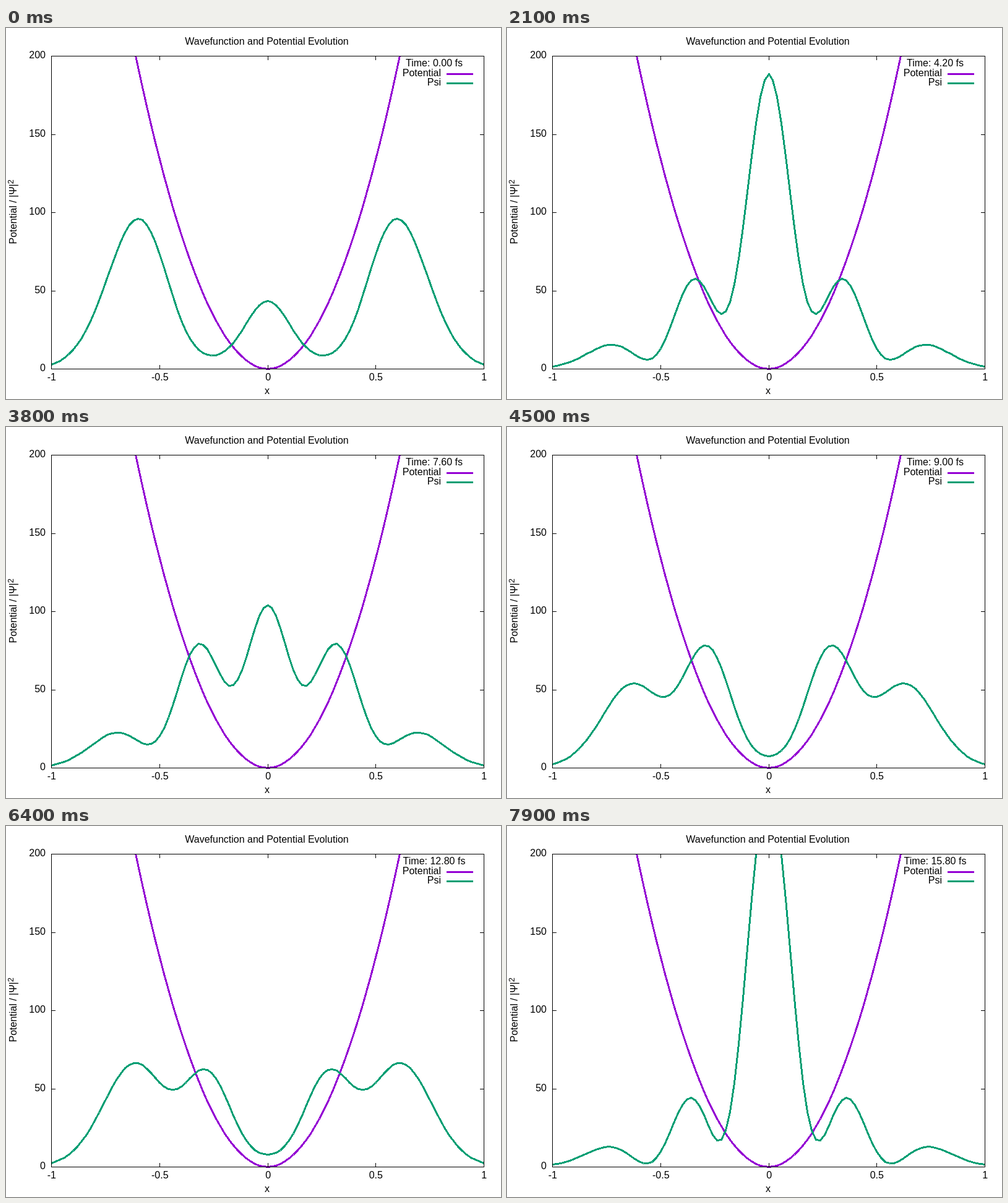
Animation, 800 px wide and 600 px high, one loop 8 s. Source, as an HTML page:

```html
<!DOCTYPE html>
<html lang="en">
<head>
<meta charset="utf-8">
<title>Wavefunction and Potential Evolution</title>
<style>
  html, body { margin: 0; width: 100%; height: 100%; overflow: hidden; background: #fff; }
  svg { display: block; }
  text { font: 16px "Liberation Sans", Arial, sans-serif; fill: #000; }
  .mid { text-anchor: middle; }
  .end { text-anchor: end; }
  .curve, .frame { fill: none; shape-rendering: crispEdges; }
  .curve { stroke-width: 3; stroke-linejoin: round; }
  .frame { stroke: #000; stroke-width: 1; }
  .potential { stroke: #9400d3; }
  .psi { stroke: #009e73; }
</style>
</head>
<body>
<svg width="800" height="600" viewBox="0 0 800 600">
  <clipPath id="area"><rect x="72" y="45" width="701" height="508"/></clipPath>
  <g clip-path="url(#area)">
    <path id="potential" class="curve potential"/>
    <path id="psi" class="curve psi"/>
  </g>
  <path class="curve potential" d="M712 74.5H755"/>
  <path class="curve psi" d="M712 89.5H755"/>
  <path id="frame" class="frame"/>
  <g id="labels"></g>
  <text class="mid" x="421.5" y="27">Wavefunction and Potential Evolution</text>
  <text class="mid" x="422" y="592">x</text>
  <text transform="translate(17 349.5) rotate(-90)">Potential / |Ψ|<tspan dy="-5.5" font-size="12.8" style="font-size:12.8px">2</tspan></text>
  <text id="time" class="mid" x="692" y="62"></text>
  <text class="end" x="703" y="78">Potential</text>
  <text class="end" x="703" y="93">Psi</text>
</svg>
<script>
const LEFT = 73, RIGHT = 772, TOP = 45, BOTTOM = 551;
const FRAME_MS = 100, FRAMES = 80, FS_PER_FRAME = 0.2;
const STIFFNESS = 535.4;  // V = STIFFNESS * x^2
const ALPHA2 = 12.4;      // inverse square of the oscillator length
const SCALE = 52.9;       // height of the squared ground state at x = 0
const BEAT = 0.5655;      // phase between neighbouring even levels, rad/fs
const SAMPLES = 100;

const $ = id => document.getElementById(id);
const px = x => Math.round(LEFT + (x + 1) / 2 * (RIGHT - LEFT));
const py = v => Math.round(BOTTOM - v / 200 * (BOTTOM - TOP));

function plot(f) {
  let d = "";
  for (let i = 0; i <= SAMPLES; i++) {
    const x = 2 * i / SAMPLES - 1;
    d += `${i ? "L" : "M"}${px(x) + 0.5} ${py(f(x)) + 0.5}`;
  }
  return d;
}

// Equal mix of the oscillator states n = 0, 2 and 4
function density(x, phase) {
  const s = ALPHA2 * x * x;
  const h2 = (2 * s - 1) / Math.SQRT2;
  const h4 = (4 * s * s - 12 * s + 3) / (2 * Math.sqrt(6));
  const re = 1 + h2 * Math.cos(phase) + h4 * Math.cos(2 * phase);
  const im = h2 * Math.sin(phase) + h4 * Math.sin(2 * phase);
  return SCALE * (re * re + im * im) * Math.exp(-s);
}

function label(text, x, y, cls) {
  const el = document.createElementNS("http://www.w3.org/2000/svg", "text");
  el.setAttribute("class", cls);
  el.setAttribute("x", x);
  el.setAttribute("y", y);
  el.textContent = text;
  $("labels").append(el);
}

function drawAxes() {
  let d = `M${LEFT + 0.5} ${TOP + 0.5}H${RIGHT + 0.5}V${BOTTOM + 0.5}H${LEFT + 0.5}Z`;
  for (const x of [-1, -0.5, 0, 0.5, 1]) {
    const p = px(x) + 0.5;
    d += `M${p} ${BOTTOM}v-6M${p} ${TOP}v7`;
    label(x, p + 0.3, 570, "mid");
  }
  for (const v of [0, 50, 100, 150, 200]) {
    const p = py(v) + 0.5;
    d += `M${LEFT} ${p}h7M${RIGHT + 1} ${p}h-7`;
    label(v, 64, Math.floor(p) + 4, "end");
  }
  $("frame").setAttribute("d", d);
}

let shown = -1;
function tick() {
  const step = Math.floor(performance.now() / FRAME_MS) % FRAMES;
  if (step !== shown) {
    shown = step;
    const t = step * FS_PER_FRAME;
    $("psi").setAttribute("d", plot(x => density(x, BEAT * t)));
    $("time").textContent = `Time: ${t.toFixed(2)} fs`;
  }
  requestAnimationFrame(tick);
}

drawAxes();
$("potential").setAttribute("d", plot(x => STIFFNESS * x * x));
tick();
</script>
</body>
</html>
```
